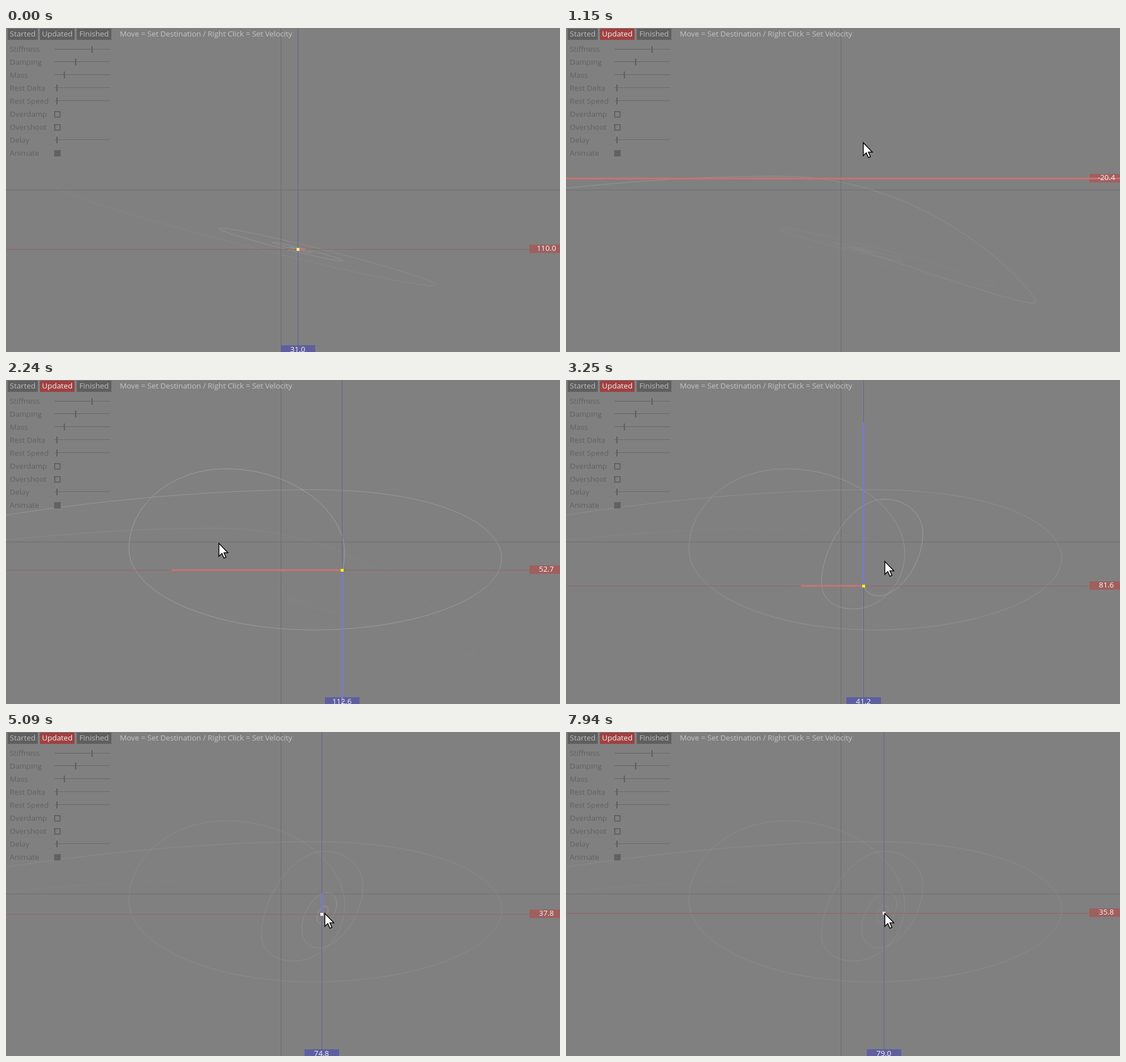
Animation, 978 px wide and 573 px high, one loop 8000 ms. Source, as an HTML page with a canvas:

```html
<!DOCTYPE html>
<html lang="en">
<head>
<meta charset="utf-8">
<title>Spring playground</title>
<style>
html, body { margin: 0; width: 100%; height: 100%; overflow: hidden; background: #808080; }
canvas { display: block; }
</style>
</head>
<body>
<canvas id="stage" width="978" height="573"></canvas>
<script>
const W = 978, H = 573, LOOP = 8000;
const ctx = document.getElementById('stage').getContext('2d');
const FONT = '13.35px "Open Sans", "Noto Sans", sans-serif';

const ORIGIN = { x: 485.6, y: 285.3 }, SCALE = 0.96;
const HOME = { x: 515.4, y: 390.9 }, REST = { x: 561.4, y: 319.8 };
const OMEGA = 7.15, GAMMA = 1.28, BEAT = 0.3372;

// Turning points [seconds, pixels]; the vertical ones come at an even beat
const turnsX = [[0, HOME.x], [0.36, 829], [1.06, -250], [1.515, 875], [1.855, 217],
  [2.213, 598], [2.47, 451], [2.863, 629.9]];
const turnsY = [HOME.y, 487, 262, 307, 194, 442, 157, 405, 210.8].map((y, i) => [i * BEAT, y]);

// Pointer path [seconds, x, y]
const pointer = [[0, 515, 391], [0.25, 700, 440], [0.75, 250, 290], [1.15, 524, 202],
  [1.65, 450, 390], [2.24, 375, 288], [2.45, 590, 350], [2.7, 562, 320]];

const mix = (a, b, u) => a + (b - a) * u;
const clamp = v => Math.max(0, Math.min(1, v));

// Damped oscillation, s seconds after a turning point at distance amp
function ring(amp, s) {
  const a = OMEGA * s;
  return amp * Math.exp(-GAMMA * s) * (Math.cos(a) + GAMMA / OMEGA * Math.sin(a));
}

// Cosine easing between keys, component c
function between(keys, t, c) {
  const i = Math.max(1, keys.findIndex(k => k[0] > t));
  const [a, b] = [keys[i - 1], keys[i]];
  const u = clamp((t - a[0]) / (b[0] - a[0]));
  return mix(a[c], b[c], (1 - Math.cos(Math.PI * u)) / 2);
}

function axis(turns, rest, t) {
  const [t0, p0] = turns[turns.length - 1];
  return t < t0 ? between(turns, t, 1) : rest + ring(p0 - rest, t - t0);
}

const posX = t => axis(turnsX, REST.x, t);
const posY = t => axis(turnsY, REST.y, t);
const speed = (f, t) => (f(t + 0.002) - f(t - 0.002)) / 0.004;

function rect(x, y, w, h, color) {
  ctx.fillStyle = color;
  ctx.fillRect(x, y, w, h);
}

function text(str, x, y, color, align = 'left') {
  ctx.fillStyle = color;
  ctx.textAlign = align;
  ctx.fillText(str, x, y);
}

function drawMenu(t) {
  for (const [name, x, w] of [['Started', 3, 53], ['Updated', 60, 61], ['Finished', 125, 61]]) {
    const lit = name === 'Updated' && t > 0.03;
    rect(x, 1, w, 20, lit ? '#a04040' : '#5f5f5f');
    text(name, x + w / 2, 15, lit ? '#f4f4f4' : '#bcbcbc', 'center');
  }
  text('Move = Set Destination / Right Click = Set Velocity', 201, 15, '#c4c4c4');

  // A number is a slider value, a boolean a checkbox
  const rows = { Stiffness: 0.67, Damping: 0.38, Mass: 0.17, 'Rest Delta': 0.045,
    'Rest Speed': 0.045, Overdamp: false, Overshoot: false, Delay: 0.045, Animate: true };
  const color = '#616161';
  Object.entries(rows).forEach(([name, value], i) => {
    const y = 37.5 + i * 22.95, cy = Math.round(y);
    text(name, 6.5, y + 4.5, color);
    if (value === true) {
      rect(85, cy - 5, 11.5, 11, color);
    } else if (value === false) {
      ctx.strokeStyle = color;
      ctx.lineWidth = 2;
      ctx.strokeRect(86, cy - 4, 9.5, 9.5);
    } else {
      const knob = Math.round(86 + 98 * value);
      rect(86, cy - 1, 98, 1, '#6a6a6a');
      rect(86, cy - 1, knob - 86, 1, color);
      rect(knob - 1, cy - 6, 2, 12, '#5c5c5c');
    }
  });
}

function drawPath(fx, fy, from, to, alpha) {
  const step = 0.008;
  ctx.lineWidth = 1;
  for (let s = from; s < to; s += step) {
    const e = Math.min(s + step, to);
    ctx.strokeStyle = `rgba(255,255,255,${alpha(s)})`;
    ctx.beginPath();
    ctx.moveTo(fx(s), fy(s));
    ctx.lineTo(fx(e), fy(e));
    ctx.stroke();
  }
}

function drawTrails(t) {
  // An earlier swing around the starting point
  const fade = Math.exp(-t / 1.2);
  drawPath(s => HOME.x + ring(-428, s), s => HOME.y + ring(-114, s + 0.03), 0, 3,
    s => (0.04 + 0.1 * clamp(s / 0.9)) * fade);

  drawPath(posX, posY, 0, Math.min(t, 5.5),
    s => 0.09 * clamp((s - 0.55) / 0.6) + 0.14 * Math.exp(-(((t - s) / 1.5) ** 2)));
}

function drawReadout(t) {
  const x = posX(t), y = posY(t), vx = speed(posX, t), vy = speed(posY, t);
  const px = Math.floor(x), py = Math.round(y);
  rect(0, py, W, 1, '#986264');
  rect(px, 0, 1, H, '#626294');

  rect(924, py - 8, 54, 15, '#a05f5f');
  rect(px - 30, 561, 61, 12, '#5f5fa0');
  if (Math.abs(vx) > 2) rect(x, y - 1, vx, 3, '#cd7172');
  if (Math.abs(vy) > 2) rect(px - 1, y, 3, vy, '#7979cf');

  const value = (p, o) => ((p - o) / SCALE).toFixed(1);
  text(value(y, ORIGIN.y), 954, py + 2.5, '#f4f4f4', 'center');
  text(value(x, ORIGIN.x), px, 573, '#f4f4f4', 'center');

  const blue = t < 0.03 ? 128 : Math.round(255 * clamp((t - 3.3) / 2));
  rect(px - 2, py - 2, 5, 5, `rgb(255,255,${blue})`);
}

function drawPointer(t) {
  if (t < 0.03) return;
  const s = Math.min(t, pointer[pointer.length - 1][0] - 1e-6);
  ctx.save();
  ctx.translate(between(pointer, s, 1) + 0.8, between(pointer, s, 2) + 0.8);
  ctx.beginPath();
  for (const [dx, dy] of [[0, 0], [0, 23], [5.3, 18], [9, 26.3], [12.6, 24.7], [9, 16.8], [16, 16.8]]) {
    ctx.lineTo(dx, dy);
  }
  ctx.closePath();
  ctx.fillStyle = '#fff';
  ctx.fill();
  ctx.strokeStyle = '#000';
  ctx.lineWidth = 1.5;
  ctx.stroke();
  ctx.restore();
}

function draw(t) {
  ctx.font = FONT;
  rect(0, 0, W, H, '#808080');
  rect(485, 0, 1, H, '#6a6a6a');
  rect(0, 286, W, 1, '#6e6e6e');
  drawTrails(t);
  drawMenu(t);
  drawReadout(t);
  drawPointer(t);
}

const begin = performance.now();
function tick() {
  draw(((performance.now() - begin) % LOOP) / 1000);
  requestAnimationFrame(tick);
}
tick();
</script>
</body>
</html>
```
